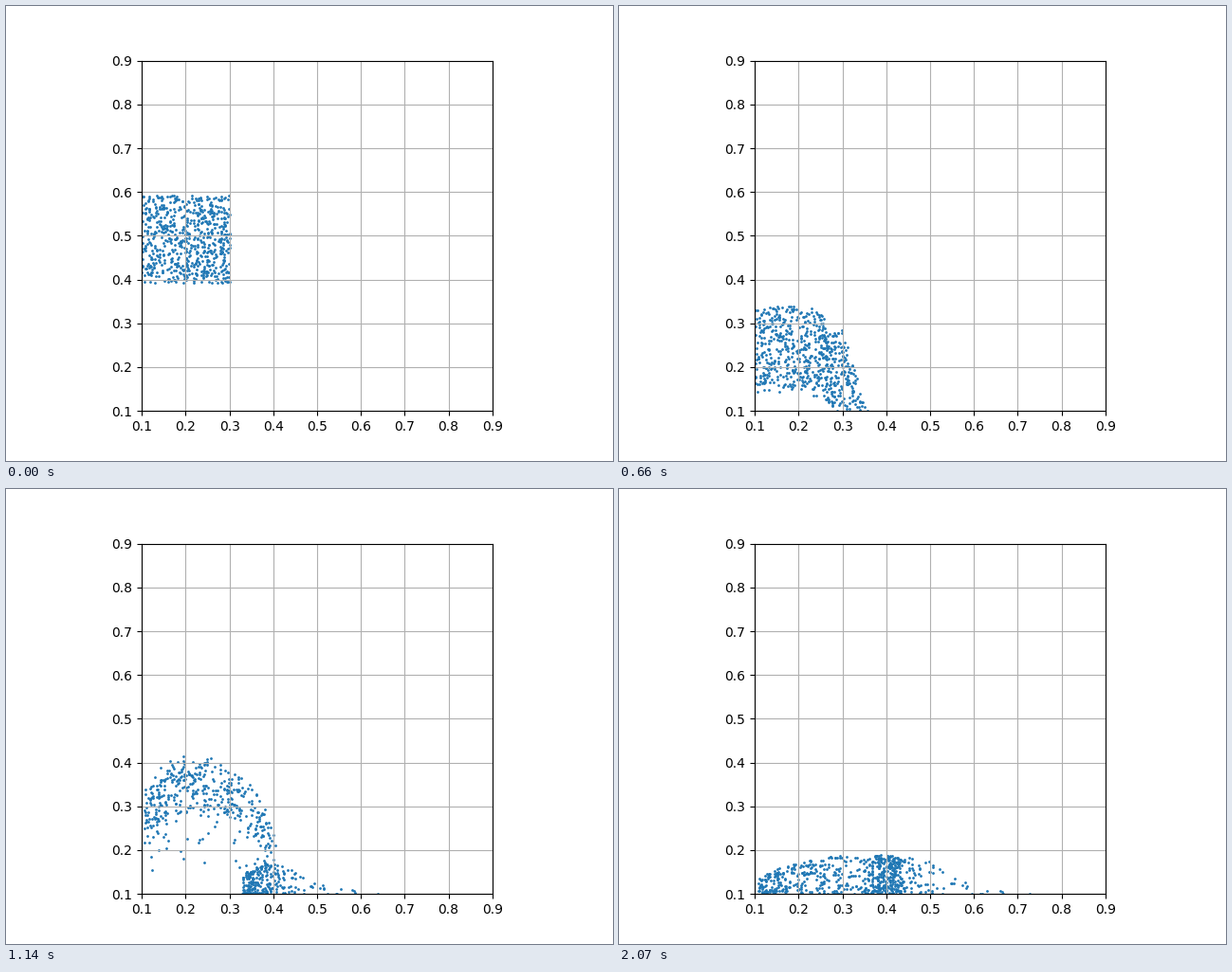
Recreate the animation shown at these times as a matplotlib script. Size 640x480 px, loop 2.1 s.

```python
import numpy as np
import matplotlib.pyplot as plt
from matplotlib.animation import FuncAnimation

FRAMES, STEP = 70, 30
COUNT = 650
K, V0 = 0.000766, 0.000326      # half gravity and starting speed, per frame
HIT, SPREAD, PILE, REST = 19.5, 26, 38, 54
SPLIT = 0.7                     # right of this share the block spills over

rng = np.random.default_rng(4)
u, v = rng.random((2, COUNT))
spill = u > SPLIT


def drop(n):
    return K * n * n + V0 * n


def mound(x):
    """Height of the settled pile."""
    return np.interp(
        x,
        [.10, .13, .17, .25, .30, .40, .45, .50, .55, .585, .62, .74],
        [.03, .05, .068, .085, .092, .094, .087, .076, .052, .03, .008, .004])


def slope(x):
    """Height of the first, smaller pile."""
    return np.interp(x, [.28, .33, .38, .43, .50, .56, .66],
                     [.02, .045, .075, .06, .028, .014, .002])


def mix(a, b, p):
    return a + (b - a) * p


x0 = 0.1 + 0.202 * u
y0 = 0.392 + 0.2 * v
y_hit = y0 - drop(HIT)

# Splash: thrown up in an arch, then lands on the pile.
s = np.minimum(u / SPLIT, 1)
vx = 0.0004 + 0.003 * s + 0.0055 * s**2 + rng.normal(0, 0.0004, COUNT)
vx = np.maximum(vx, 0.0003)
vy = 0.0199 + 0.005 * (1 - v) - 0.010 * s**7
vy -= 0.004 * np.clip(1 - u / 0.2, 0, 1)
vy += rng.normal(0, 0.0005, COUNT)
slow = (rng.random(COUNT) < 0.12) & (v < 0.6)
vy -= slow * rng.uniform(0.003, 0.008, COUNT)
layer = np.where(slow, 0.3 * v, v)
t_land = np.full(COUNT, 29.0)
for _ in range(3):
    y_land = 0.1 + mound(x0 + vx * t_land) * layer
    root = np.maximum(vy**2 + 4 * K * (y_hit - y_land), 0)
    t_land = (vy + np.sqrt(root)) / (2 * K)

# Spill: slides out to the right along the floor.
q = np.clip((u - SPLIT) / (1 - SPLIT), 0, 1)
fill = rng.random(COUNT)
xa = mix(0.25 + 0.07 * (1 - v), 0.30 + 0.15 * (1 - v)**1.1, q)
ya = 0.102 + v * (0.14 + 0.03 * q)
xb = xa + 0.01 + 0.07 * v + 0.2 * q**3 * (1 - v)**3
yb = 0.1 + slope(xb) * fill
xc = xb + 0.04 + 0.17 * (xb - 0.35)
yc = 0.1 + mound(xc) * fill


def splash(n):
    t = n - HIT
    x = x0 + vx * np.minimum(t, t_land)
    y = np.where(t < t_land, y_hit + vy * t - K * t * t, y_land)
    return x, y


def slide(n):
    if n < SPREAD:
        p = (n - HIT) / (SPREAD - HIT)
        return mix(x0, xa, p), mix(y_hit, ya, p)
    if n < PILE:
        p = (n - SPREAD) / (PILE - SPREAD)
        return mix(xa, xb, p), mix(yb, ya, (1 - p)**2)
    p = min((n - PILE) / (REST - PILE), 1)
    return mix(xb, xc, 1 - (1 - p)**2), mix(yb, yc, p)


def positions(n):
    if n < HIT:
        return np.column_stack([x0, y0 - drop(n)])
    pts = np.where(spill, slide(n), splash(n))
    if n > REST:
        p = (n - REST) / (FRAMES - 1 - REST)
        sink = 0.04 * p * (pts[0] < 0.63)
        pts[1] = 0.1 + (pts[1] - 0.1) * (1 - sink)
    return pts.T


fig, ax = plt.subplots(figsize=(6.4, 4.8), dpi=100)
ax.set_aspect("equal")
ax.set(xlim=(0.1, 0.9), ylim=(0.1, 0.9))
ticks = np.arange(1, 10) / 10
ax.set_xticks(ticks)
ax.set_yticks(ticks)
ax.grid(True)
dots = ax.scatter(x0, y0, s=1, color="tab:blue")


def update(n):
    dots.set_offsets(positions(n))
    return dots,


anim = FuncAnimation(fig, update, frames=FRAMES, interval=STEP,
                     repeat=True, repeat_delay=0)
plt.show()
```
